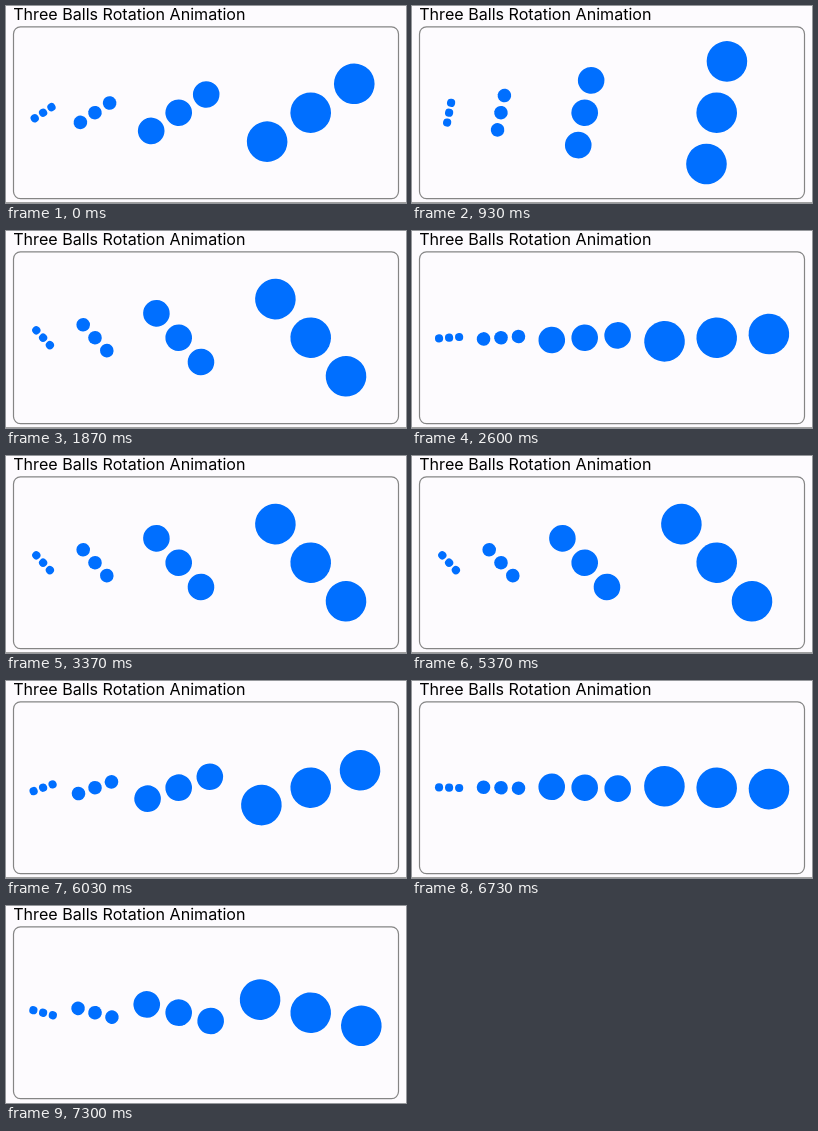
Animation, 400 px wide and 197 px high, one loop 7330 ms. Source, as an HTML page:

```html
<!DOCTYPE html>
<html lang="en">
<head>
<meta charset="utf-8">
<title>Three Balls Rotation Animation</title>
<style>
  html, body { margin: 0; width: 100%; height: 100%; overflow: hidden; background: #fdfbfe; }
  svg { display: block; width: 400px; height: 197px; }
  text { font: 16.1px Inter, "Liberation Sans", sans-serif; fill: #000; }
  .panel { fill: none; stroke: #858585; stroke-width: 1.2; }
  .rule { fill: #a0a0a0; }
  .balls { fill: #006fff; }
</style>
</head>
<body>
<svg viewBox="0 0 400 197">
  <text x="7.2" y="14.4">Three Balls Rotation Animation</text>
  <rect class="panel" x="7.5" y="20.9" width="385" height="171.7" rx="7"/>
  <rect class="rule" id="rule" y="196" width="400" height="1"/>
  <g class="balls" id="balls"></g>
</svg>
<script>
const LOOP = 7330, FRAME = 100 / 3;
const TURN = 500, TURN_START = 195.5, TURN_LENGTH = 470;
const RULE_END = 7200;
const CENTER_Y = 106.7;

const spinners = [
  { x: 37.1, orbit: 10.05, r: 4.1 },
  { x: 89, orbit: 17.5, r: 6.8 },
  { x: 172.7, orbit: 33, r: 13.3 },
  { x: 304.7, orbit: 52.3, r: 20.3 }
];

const stage = document.getElementById("balls");
const rule = document.getElementById("rule");

for (const s of spinners) {
  s.group = document.createElementNS("http://www.w3.org/2000/svg", "g");
  for (const side of [-1, 0, 1]) {
    const ball = document.createElementNS("http://www.w3.org/2000/svg", "circle");
    ball.setAttribute("cx", side * s.orbit);
    ball.setAttribute("r", s.r);
    s.group.append(ball);
  }
  stage.append(s.group);
}

// Cubic bezier easing (.52, 0, .42, 1), solved by bisection.
function ease(x) {
  let lo = 0, hi = 1;
  for (let i = 0; i < 24; i++) {
    const s = (lo + hi) / 2, q = 1 - s;
    const at = 3 * 0.52 * s * q * q + 3 * 0.42 * s * s * q + s * s * s;
    if (at < x) lo = s; else hi = s;
  }
  return lo * lo * (3 - 2 * lo);
}

function draw(ms) {
  // The picture advances at 30 steps per second.
  const t = Math.floor((ms % LOOP + 5) / FRAME) * FRAME;
  const phase = (t - TURN_START + TURN) % TURN;
  const angle = 180 * ease(Math.min(1, phase / TURN_LENGTH));
  for (const s of spinners) {
    s.group.setAttribute("transform", `translate(${s.x} ${CENTER_Y}) rotate(${angle})`);
  }
  rule.setAttribute("visibility", t < RULE_END ? "visible" : "hidden");
}

const start = performance.now();
function tick() {
  draw(performance.now() - start);
  requestAnimationFrame(tick);
}
tick();
</script>
</body>
</html>
```
